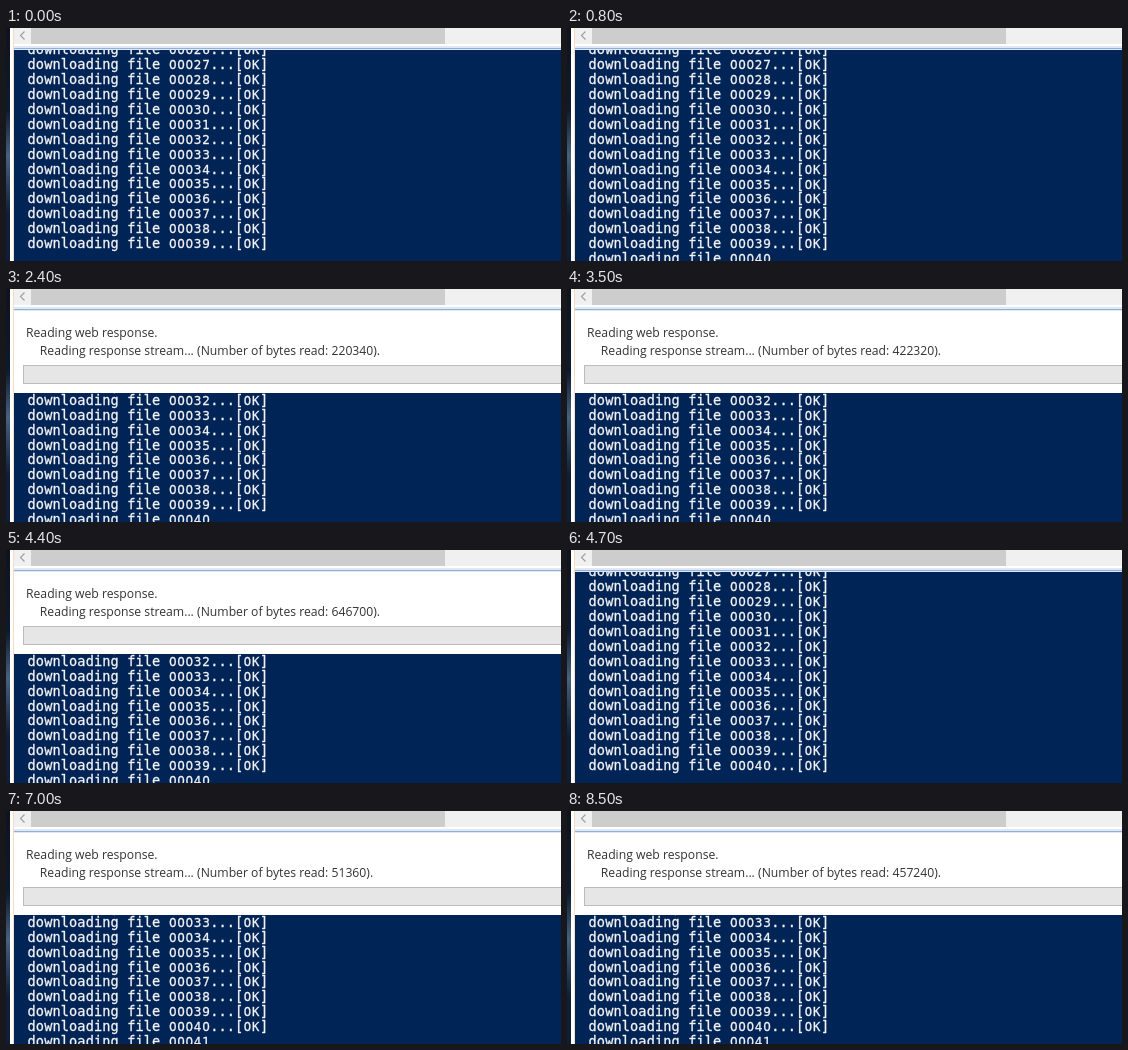
Animation, 555 px wide and 233 px high, one loop 8600 ms. Source, as an HTML page with a canvas:

```html
<!DOCTYPE html>
<html lang="en">
<head>
<meta charset="utf-8">
<title>Download console</title>
<style>
  html, body { margin: 0; width: 100%; height: 100%; overflow: hidden; }
  canvas { display: block; }
</style>
</head>
<body>
<canvas id="stage" width="555" height="233"></canvas>
<script>
const ctx = document.getElementById("stage").getContext("2d");
const LOOP = 8600;
const CELL = 8.3;
const TICK = 250;            // ms between counter updates
const ACCELERATION = 0.0112; // bytes per ms²

// The line appears at start, the panel opens later, both end when the file is done
const downloads = [
  { file: 40, start: 800, opens: 1400, end: 4700, bytes: 40760, rate: 168.38 },
  { file: 41, start: 6500, opens: 7000, end: LOOP, bytes: 51360, rate: 253.79 }
];

function bytesRead(download, time) {
  const t = Math.floor((time - download.opens) / TICK) * TICK;
  return Math.round((download.bytes + download.rate * t + ACCELERATION * t * t) / 20) * 20;
}

function rect(color, x, y, w, h) {
  ctx.fillStyle = color;
  ctx.fillRect(x, y, w, h);
}

function consoleFont(char) {
  if (/\d/.test(char)) return '12px "DejaVu Sans", sans-serif';
  return `${/[A-Z]/.test(char) ? 12.2 : 13.6}px "DejaVu Sans Mono", monospace`;
}

function drawConsoleLine(text, baseline) {
  ctx.fillStyle = ctx.strokeStyle = "#f4f3f5";
  ctx.lineWidth = 0.3;
  ctx.textAlign = "center";
  [...text].forEach((char, i) => {
    const x = 21.5 + (i + 0.5) * CELL;
    ctx.font = consoleFont(char);
    ctx.fillText(char, x, baseline);
    ctx.strokeText(char, x, baseline);
  });
}

function drawConsole(lastDone, busy) {
  rect("#012456", 8, 22, 547, 211);
  ctx.save();
  ctx.beginPath();
  ctx.rect(8, 22, 547, 211);
  ctx.clip();
  for (let row = -1; row <= (busy ? 13 : 12); row++) {
    const file = lastDone - 12 + row;
    const nudge = row > (busy ? 8 : 7) ? 1 : 0;
    const status = file > lastDone ? "" : "...[OK]";
    drawConsoleLine("downloading file " + String(file).padStart(5, "0") + status, 41 + 15 * row - nudge);
  }
  ctx.restore();
}

function drawPanel(bytes) {
  rect("#fff", 8, 22, 547, 82);
  ctx.font = '12.2px "Open Sans", sans-serif';
  ctx.textAlign = "left";
  ctx.fillStyle = "#333";
  ctx.fillText("Reading web response.", 20, 48);
  ctx.fillText(`Reading response stream... (Number of bytes read: ${bytes}).`, 33.8, 66);
  rect("#bcbcbc", 17, 76, 538, 19);
  rect("#e6e6e6", 18, 77, 537, 17);
}

function drawWindow() {
  rect("#fff", 0, 0, 555, 233);
  const desktop = ctx.createLinearGradient(0, 0, 0, 233);
  desktop.addColorStop(0, "#10131c");
  desktop.addColorStop(0.35, "#0d1a2e");
  desktop.addColorStop(0.55, "#45627f");
  desktop.addColorStop(0.8, "#0e1e36");
  rect(desktop, 0, 0, 4, 233);
  rect("#f6dcc0", 7, 0, 1, 233);
  rect("#f0f0f0", 8, 0, 547, 16);
  rect("#cdcdcd", 25, 0, 414, 16);
  rect("#dfe8f4", 8, 18, 547, 4);
  rect("#8fb0d8", 8, 20, 547, 1);
  ctx.strokeStyle = "#a0a0a0";
  ctx.lineWidth = 1.2;
  ctx.beginPath();
  ctx.moveTo(18.5, 3.5);
  ctx.lineTo(14.5, 7.5);
  ctx.lineTo(18.5, 11.5);
  ctx.stroke();
}

function draw(now) {
  const time = now % LOOP;
  const active = downloads.find(d => time >= d.start && time < d.end);
  const finished = time < downloads[0].end ? 39 : 40;
  drawWindow();
  drawConsole(finished, Boolean(active));
  if (active && time >= active.opens) drawPanel(bytesRead(active, time));
  requestAnimationFrame(draw);
}

requestAnimationFrame(draw);
</script>
</body>
</html>
```
